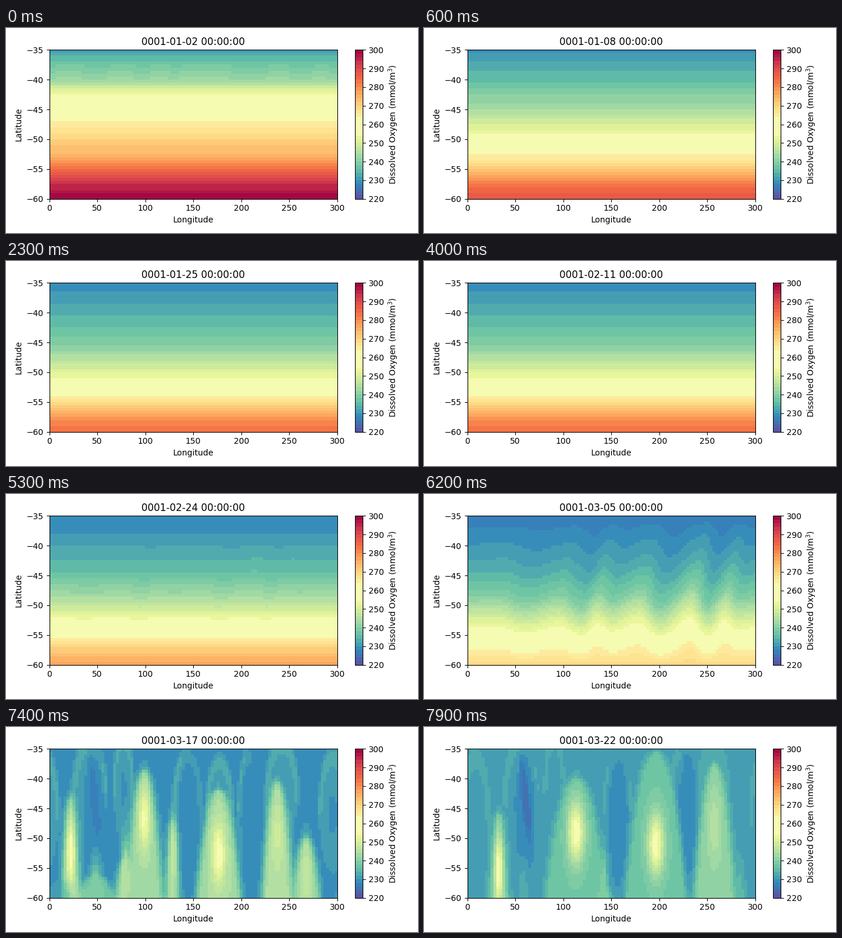
Write a matplotlib script that moves like this. It is 700 by 350 pixels and loops after 8000 ms.

```python
import numpy as np
import matplotlib.pyplot as plt
from matplotlib.animation import FuncAnimation
from matplotlib.colors import ListedColormap

plt.rcParams["font.family"] = "DejaVu Sans"

DAYS = 80
WAVY, STIRRED = 62, 70           # days of the meander and of the full eddies
SPEED = 2.7                      # eastward drift, degrees per day
NX, NY = 100, 50

x, south = np.meshgrid((np.arange(NX) + 0.5) * 300 / NX,
                       35 + (np.arange(NY) + 0.5) * 25 / NY)

# Key points (degrees south, oxygen) of the zonal profiles
START = [(35, 231), (37, 236.5), (40.5, 243.5), (42, 253), (47, 264),
         (50, 270), (53, 275), (56, 287.5), (58, 295), (60, 300)]
SETTLED = [(35, 229), (39, 233), (44.5, 239), (48, 247.7), (50, 253),
           (53.5, 264), (57, 278), (58.5, 283), (60, 285)]
MIXED = [(35, 227), (38, 228.5), (44, 233), (48.5, 239), (53.5, 253),
         (57.6, 264), (60, 269)]

# Troughs and crests of the meander (longitude, degrees north)
WAVE = [(0, .3), (30, .5), (60, -1), (95, .6), (119, -1.7), (135, 1.2),
        (150, -.6), (178, 1.5), (200, -2), (232, 2.4), (250, -1.8),
        (268, 1.8), (281, -.2), (300, .3)]

# Plumes, first and last: longitude, crest, half width, body, core latitude, core
PLUMES = np.array([
    [(40, 53, 20, 242, 58, 243), (58, 60, 20, 233, 58, 233)],
    [(14, 41, 10, 247, 50, 257), (32.5, 46, 9, 242, 55.5, 258)],
    [(69, 48, 11, 249, 54, 254), (92, 60, 11, 236, 58, 236)],
    [(87, 37.5, 9, 248, 45, 254), (113, 40, 32, 237.5, 49, 257)],
    [(117, 38.5, 8, 248, 48, 254), (142, 58, 6, 239, 58, 240)],
    [(160, 47, 16, 249, 54, 257), (196, 35.5, 32, 237.5, 51, 257)],
    [(221, 43, 12, 248, 51, 251), (257, 37.5, 21, 241.5, 48, 246)],
    [(254, 42, 14, 249, 53, 258), (283, 60, 14, 236, 60, 236)],
])
# Swirls between the plumes: longitude, latitude, radii
SWIRLS = [(31, 43, 17, 9), (66, 42, 10, 9), (132, 45, 14, 9), (166, 45, 13, 8),
          (195, 46, 9, 10), (231, 43, 16, 9), (284, 46, 14, 10)]
TROUGHS = [(36, 60), (136, 157), (195, 229)]


def smooth(u):
    u = np.clip(u, 0, 1)
    return u * u * (3 - 2 * u)


def mix(a, b, w):
    return a + (b - a) * w


def linear(v, points):
    return np.interp(v, *zip(*points))


def curve(v, points):
    px, py = np.array(points, float).T
    k = np.clip(np.searchsorted(px, v, side="right") - 1, 0, len(px) - 2)
    return mix(py[k], py[k + 1], smooth((v - px[k]) / (px[k + 1] - px[k])))


def offset(cx):
    return (x - cx + 150) % 300 - 150


def radius(cx, cy, rx, ry):
    return np.hypot(offset(cx) / rx, (south - cy) / ry)


def stepped_cmap(step=2, n=640):
    v = 220 + (np.arange(n) + 0.5) * 80 / n
    v = (np.floor(v / step) + 0.5) * step
    v[(v > 253) & (v < 264)] = 257          # one broad pale band
    return ListedColormap(plt.get_cmap("Spectral_r")((v - 220) / 80))


def profile(t, lat):
    settled = linear(lat - 0.6 * smooth((t - 15) / 8), SETTLED)
    v = mix(settled, linear(lat, START), np.exp(-t / 3.6))
    return mix(v, linear(lat, MIXED), np.clip((t - 45) / (WAVY - 45), 0, 1))


def meander(t):
    size = min(np.exp((t - WAVY) / 3.2), 2.6)
    reach = np.interp(south, [35, 38, 45, 57, 60], [0, .8, 1, .6, 0])
    lean = 1.2 * np.maximum(50 - south, 0)
    phase = (x - lean - SPEED * (t - WAVY)) % 300
    return profile(t, south + size * reach * curve(phase, WAVE))


def plume(v, cx, crest, half, body, core_lat, core):
    rise = np.clip((south - crest) / max(60 - crest, 0.5), 0, 1)
    reach = half * rise ** 0.45 - 3 * np.maximum(crest - south, 0)
    edge = np.clip((reach - abs(offset(cx))) / 1.8, -30, 30)
    v = mix(v, np.maximum(v, body), 1 / (1 + np.exp(-edge)))
    w = np.exp(-radius(cx, core_lat, 2 + 0.2 * half, 5) ** 2)
    return mix(v, np.maximum(v, core), w)


def swirl(v, cx, cy, rx, ry, strength):
    r = radius(cx, cy, rx, ry)
    v = mix(v, 232, strength * np.exp(-r ** 6))
    v = mix(v, 229, strength * np.exp(-(r / 0.45) ** 4))
    rim = np.exp(-((r - 0.95) / 0.16) ** 2) * smooth((cy + 4 - south) / 6)
    return mix(v, 235, strength * rim)


def eddies(t):
    age = (t - STIRRED) / (DAYS - 1 - STIRRED)
    u = np.clip(age, 0, 1)
    v = np.full(x.shape, mix(227.3, 231.5, u))
    for cx, cy, rx, ry in SWIRLS:
        v = swirl(v, cx + SPEED * (t - STIRRED), cy, rx, ry, 1 - 0.6 * u)
    for first, last in TROUGHS:
        v = mix(v, 228.3, np.exp(-radius(mix(first, last, age), 47, 11, 12) ** 4))
    # Coldest filament, leaning inside the first trough
    cx = mix(*TROUGHS[0], age) + 0.6 * (south - 43)
    v = mix(v, 224.5, np.exp(-radius(cx, 43.5, 4, 6.5) ** 4) * u)
    for first, last in PLUMES:
        cx = mix(first[0], last[0], age)
        crest, half, body, core_lat, core = mix(first[1:], last[1:], u)
        crest = mix(60, crest, smooth((t - 58) / (STIRRED - 58)))
        v = plume(v, cx, crest, half, body, core_lat, core)
    # Cold pocket that cuts off the western plume
    return mix(v, 231, (1 - u) * np.exp(-radius(8, 59.5, 15, 2.6) ** 4))


def oxygen(t):
    if t <= WAVY:
        return meander(t)
    if t >= STIRRED:
        return eddies(t)
    return mix(meander(t), eddies(t), smooth((t - WAVY) / (STIRRED - WAVY)))


def date(t):
    month, day = 1, t + 2
    for length in (31, 28):
        if day > length:
            month, day = month + 1, day - length
        else:
            break
    return f"0001-{month:02d}-{day:02d} 00:00:00"


fig, ax = plt.subplots(figsize=(7, 3.5), dpi=100)
image = ax.imshow(oxygen(0), cmap=stepped_cmap(), vmin=220, vmax=300,
                  extent=(0, 300, -60, -35), aspect="auto",
                  interpolation="nearest")
ax.set_xlabel("Longitude")
ax.set_ylabel("Latitude")
title = ax.set_title(date(0))
bar = fig.colorbar(image, ax=ax, ticks=range(220, 301, 10))
bar.set_label("Dissolved Oxygen (mmol/m$^3$)")
fig.tight_layout()


def update(t):
    image.set_data(oxygen(t))
    title.set_text(date(t))
    return image, title


anim = FuncAnimation(fig, update, frames=DAYS, interval=100, repeat=True,
                     repeat_delay=0, blit=False)
plt.show()
```
